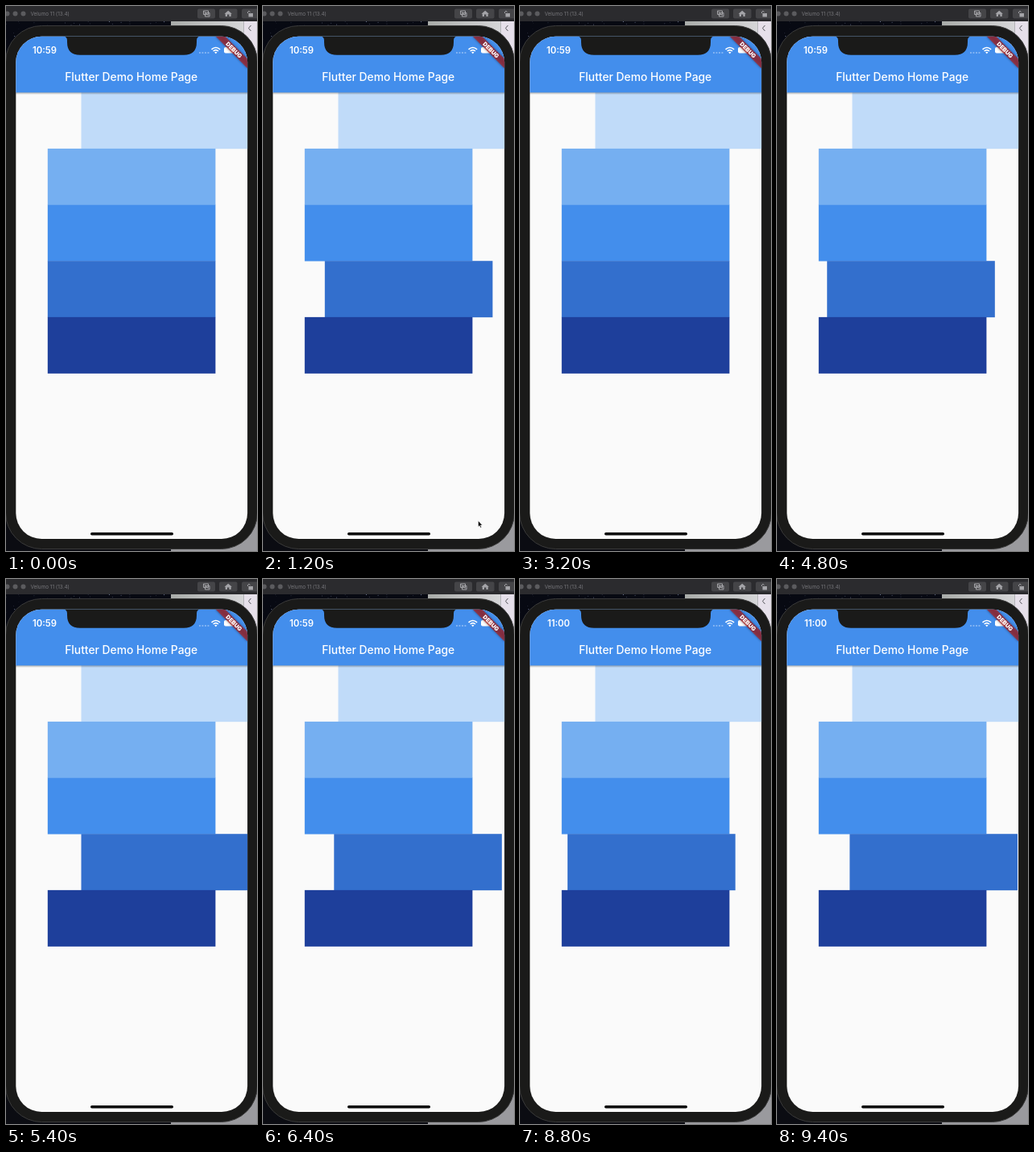
Recreate the animation shown at these times as an HTML page. Size 312 by 676 pixels, loop 9600 ms.

```html
<!DOCTYPE html>
<html lang="en">
<head>
<meta charset="utf-8">
<title>Sliding rows</title>
<style>
  html, body { margin: 0; width: 100%; height: 100%; overflow: hidden; background: #0b0c12; }
  svg { display: block; width: 312px; height: 676px; }
  text { font-family: Inter, Roboto, sans-serif; fill: #fff; }
  .icon { fill: none; stroke: #a4a4a8; stroke-width: 1; stroke-linejoin: round; }
</style>
</head>
<body>
<svg viewBox="0 0 312 676">
  <defs>
    <clipPath id="screen"><rect x="12.300" y="37.800" width="287.800" height="623.200" rx="32"/></clipPath>
    <linearGradient id="shade" x2="0" y2="1">
      <stop stop-color="#000" stop-opacity=".32"/>
      <stop offset="1" stop-color="#000" stop-opacity="0"/>
    </linearGradient>
    <linearGradient id="desk">
      <stop stop-color="#a9aca9"/>
      <stop offset="1" stop-color="#d6d6d8"/>
    </linearGradient>
    <filter id="soft" x="-20%" y="-80%" width="140%" height="260%"><feGaussianBlur stdDeviation="1.500"/></filter>
  </defs>

  <!-- desktop -->
  <rect y="19" width="205" height="60" fill="#070912"/>
  <g id="stars"></g>
  <rect x="205" y="19" width="90" height="30" fill="url(#desk)"/>
  <rect x="295" y="19" width="17" height="60" fill="#e6e0ea"/>
  <path d="M295.500 19V60" stroke="#b4b4b8"/>
  <path d="M304.500 24l-3 3.500 3 3.500" fill="none" stroke="#55555a"/>
  <rect x="205" y="620" width="107" height="56" fill="#9a9a9e"/>

  <!-- window bar -->
  <rect width="312" height="19" fill="#2b2b2e"/>
  <g fill="#5b5b5e">
    <circle cx="1.500" cy="9.500" r="3"/>
    <circle cx="11.500" cy="9.500" r="3"/>
    <circle cx="21.500" cy="9.500" r="3"/>
  </g>
  <text x="30.500" y="12" font-size="6.400" style="fill:#77777b">Velumo 11 (13.4)</text>
  <g fill="#454548">
    <rect x="238" y="3.500" width="22" height="12" rx="2"/>
    <rect x="265" y="3.500" width="22.500" height="12" rx="2"/>
    <rect x="293" y="3.500" width="24" height="12" rx="2"/>
  </g>
  <path class="icon" d="M245.500 6h6v4.500h-6zM247.500 8.500h5.500v4.500h-5.500zM246.500 7l5 4.500"/>
  <path d="M271.500 9.700l4.700-4 4.700 4h-1.200v3.300h-2.300v-2.500h-2.400v2.500h-2.300V9.700z" fill="#a4a4a8"/>
  <path class="icon" d="M300.500 9V7.500q1.500-2.500 3 0"/>
  <rect x="301.500" y="9" width="5.500" height="4.500" fill="#a4a4a8"/>

  <!-- device -->
  <rect x="-.5" y="24.500" width="313" height="649" rx="45" fill="#1a1a19" stroke="#3a3a3a"/>

  <g clip-path="url(#screen)">
    <rect x="12" y="37" width="289" height="626" fill="#fafafa"/>
    <g id="rows"></g>
    <rect x="12" y="107" width="289" height="3" fill="url(#shade)"/>
    <rect x="12" y="37" width="289" height="70.300" fill="#438eec"/>

    <text id="clock" x="48" y="59" font-size="11.300" font-weight="600" text-anchor="middle"></text>
    <text x="155.700" y="92.700" font-size="13.850" font-weight="500" text-anchor="middle">Flutter Demo Home Page</text>

    <path d="M240 58h12.500" stroke="#fff" stroke-opacity=".45" stroke-width="1.700" stroke-dasharray="1.900 1.600"/>
    <g fill="none" stroke="#fff" stroke-width="1.600">
      <path d="M255.500 53.800q5.300-4.600 10.600 0"/>
      <path d="M257.600 56q3.200-2.700 6.400 0"/>
    </g>
    <path d="M260.800 59.300l-1.700-1.800q1.700-1.300 3.400 0z" fill="#fff"/>
    <rect x="271" y="51" width="15" height="7.500" rx="2" fill="#fff"/>

    <g transform="translate(300.100 37.800) rotate(45)">
      <rect x="-27.800" y="19.500" width="55.600" height="8.340" fill-opacity=".45" filter="url(#soft)"/>
      <rect x="-27.800" y="19.500" width="55.600" height="8.340" fill="#b71c1c" fill-opacity=".65"/>
      <text y="26.200" font-size="7.100" font-weight="900" text-anchor="middle">DEBUG</text>
    </g>

    <path d="M71 37.300q5 .5 5 5.500v2q0 16 16 16h129q16 0 16-16v-2q0-5 5-5.500z" fill="#1a1a19"/>
    <rect x="105" y="653" width="103" height="3.500" rx="1.750" fill="#050505"/>
  </g>

  <path id="pointer" d="M267.500 638.500v7.500l1.700-1.500 1.200 2.700 1.200-.6-1.200-2.500h2.200z"
        fill="#000" stroke="#fff" stroke-width=".5"/>
</svg>

<script>
const LOOP = 9600, STEP = 200;
const HOME = 51.8, SHIFT = 41.7, ROW = 69.67;
const $ = id => document.getElementById(id);

function add(parent, tag, attrs) {
  const el = document.createElementNS('http://www.w3.org/2000/svg', tag);
  for (const key in attrs) el.setAttribute(key, attrs[key]);
  return parent.appendChild(el);
}

let seed = 7;
const rand = () => (seed = seed * 16807 % 2147483647) / 2147483647;
for (let i = 0; i < 90; i++) {
  add($('stars'), 'circle', {
    cx: rand() * 205, cy: 19 + rand() * 24, r: 0.25 + rand() * 0.4,
    fill: '#aebbe0', opacity: 0.25 + rand() * 0.65
  });
}

// Each row reaches slightly under the next one, so no seam shows.
const rows = ['#c0dbf9', '#75aff1', '#438eec', '#336fcd', '#1e3f9b'].map((fill, i) =>
  add($('rows'), 'rect', { x: HOME, y: 107.2 + i * ROW, width: 208.6, height: ROW + 0.3, fill }));

const ramp = (t, from, to) => Math.min(1, Math.max(0, (t - from) / (to - from)));

// The app restarts at 2000 ms: both rows jump home and the first slides in again.
const firstRow = t => t < 2000 ? 1 : ramp(t, 2156, 3094);
const fourthRow = t => t < 2000
  ? ramp(t, 720, 1520)
  : ramp(t, 4600, 5400) - ramp(t, 6300, 7100) + ramp(t, 8660, 9460);

function draw() {
  const t = Math.floor(performance.now() % LOOP / STEP) * STEP;
  rows[0].setAttribute('x', HOME + SHIFT * firstRow(t));
  rows[3].setAttribute('x', HOME + SHIFT * fourthRow(t));
  $('clock').textContent = t < 6800 ? '10:59' : '11:00';
  $('pointer').style.display = t >= 1200 && t < 1600 ? '' : 'none';
  requestAnimationFrame(draw);
}
draw();
</script>
</body>
</html>
```
